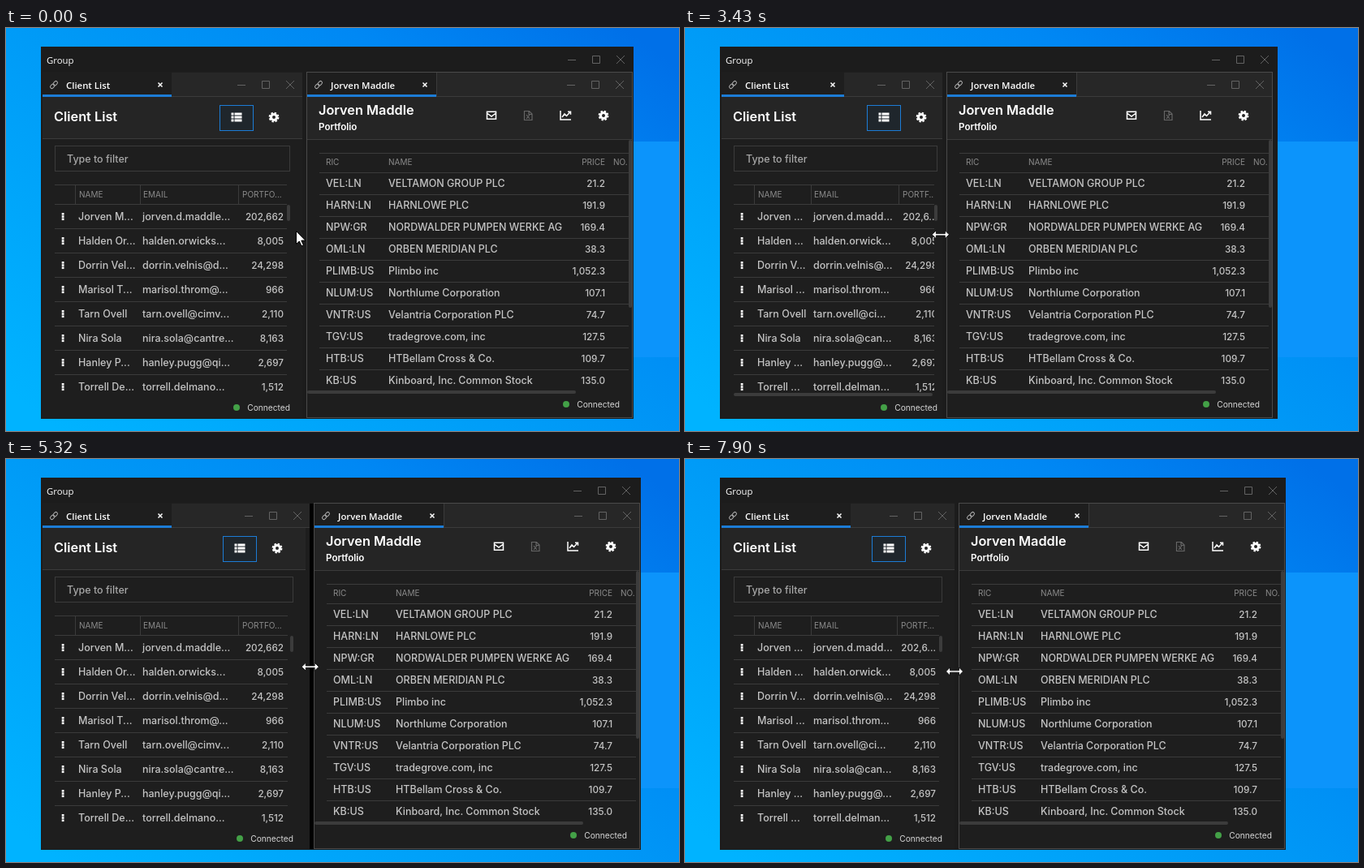
An HTML page that plays this animation: 829x497 px, repeating every 9.03 s.

```html
<!DOCTYPE html>
<html lang="en">
<head>
<meta charset="utf-8">
<title>Resizable panels</title>
<style>
html, body { margin: 0; width: 100%; height: 100%; overflow: hidden; background: #0a8ff0; }
svg { display: block; width: 829px; height: 497px; font-family: Inter, "Open Sans", sans-serif; }
.win { font-family: "Open Sans", "Noto Sans", sans-serif; font-size: 11.4px; fill: #fff; }
.tab { font-weight: 600; }
.title { font-size: 16.3px; font-weight: 600; fill: #fff; }
.sub { font-size: 11.6px; font-weight: 600; fill: #fff; }
.head { font-size: 10px; fill: #8b8b8b; }
.cell { font-size: 12.5px; font-weight: 500; fill: #c4c4c4; }
.num { font-size: 11.7px; }
.status { font-size: 10.2px; fill: #d6d6d6; }
.hover { fill: #fff; font-weight: 600; }
.end { text-anchor: end; }
.line { stroke: #3b3b3b; fill: none; shape-rendering: crispEdges; }
.controls { stroke: #636363; fill: none; }
.icon { stroke: #fff; fill: none; stroke-width: 1.5; }
</style>
</head>
<body>
<svg viewBox="0 0 829 497" id="stage"></svg>
<script>
const LOOP = 9030, STEP = 70;

// Left edge of the right panel over time.
const edgeKeys = [[0, 370], [2310, 370], [2590, 361], [2730, 357], [2870, 353], [3220, 336],
  [3710, 303], [3850, 302], [3920, 301], [3990, 301], [4130, 308], [4480, 343], [4620, 352], [4760, 360],
  [5040, 370], [5740, 392], [5880, 397], [5950, 398], [6360, 398], [6430, 396], [6780, 373],
  [6920, 368], [6990, 362], [7060, 359], [7270, 350], [7620, 337], [7900, 337]];
const cursorYKeys = [[2310, 253], [2870, 253], [3990, 256.5], [4760, 254.5], [5880, 258], [7060, 260.5], [7900, 262]];
const arrowKeys = [[0, 357, 250], [520, 361, 250], [585, 366, 251], [650, 370, 252], [1110, 367, 252]];

const clients = [
  ["Jorven Maddle", "jorven.d.maddle@zelvora.example", "202,662"],
  ["Halden Orwicks", "halden.orwicks@ambrilo.example", "8,005"],
  ["Dorrin Velnis", "dorrin.velnis@dulvine.example", "24,298"],
  ["Marisol Throm", "marisol.throm@krelma.example", "966"],
  ["Tarn Ovell", "tarn.ovell@cimvora.example", "2,110"],
  ["Nira Sola", "nira.sola@cantrex.example", "8,163"],
  ["Hanley Pugg", "hanley.pugg@qiv.example", "2,697"],
  ["Torrell Delmano", "torrell.delmano@sprilla.example", "1,512"]];
const holdings = [
  ["VEL:LN", "VELTAMON GROUP PLC", "21.2"],
  ["HARN:LN", "HARNLOWE PLC", "191.9"],
  ["NPW:GR", "NORDWALDER PUMPEN WERKE AG", "169.4"],
  ["OML:LN", "ORBEN MERIDIAN PLC", "38.3"],
  ["PLIMB:US", "Plimbo inc", "1,052.3"],
  ["NLUM:US", "Northlume Corporation", "107.1"],
  ["VNTR:US", "Velantria Corporation PLC", "74.7"],
  ["TGV:US", "tradegrove.com, inc", "127.5"],
  ["HTB:US", "HTBellam Cross & Co.", "109.7"],
  ["KB:US", "Kinboard, Inc. Common Stock", "135.0"]];

const rect = (x, y, w, h, fill, more = "") =>
  `<rect x="${x}" y="${y}" width="${w}" height="${h}" fill="${fill}" ${more}/>`;
const text = (x, y, cls, str, more = "") =>
  `<text x="${x}" y="${y}" class="${cls}" ${more}>${str.replace(/&/g, "&amp;")}</text>`;
const path = (d, cls, more = "") => `<path d="${d}" class="${cls}" ${more}/>`;
const at = (x, y, body) => `<g transform="translate(${x} ${y})">${body}</g>`;

const controls = (x, y) => at(x, y, path("M-5 .5H5M25.5-4.5h9v9h-9zM55-5l10 10M65-5l-10 10", "controls"));
const gear = (x, y) => at(x, y,
  '<circle r="3.5" fill="none" stroke="#fff" stroke-width="3"/>' +
  '<circle r="5.4" fill="none" stroke="#fff" stroke-width="2" stroke-dasharray="2.4 1.84"/>');
const link = (x, y) => at(x, y,
  '<g transform="rotate(-45)" fill="none" stroke="#aaa"><rect x="-5.5" y="-2" width="6" height="4" rx="2"/>' +
  '<rect x="-.5" y="-2" width="6" height="4" rx="2"/></g>');
const cross = (x, y) => path(`M${x - 2.5} ${y - 2.5}l5 5m0-5l-5 5`, "icon");
const connected = (right, y) =>
  `<circle cx="${right - 66}" cy="${y}" r="4" fill="#43a047"/>` + text(right, y + 4, "status end", "Connected");

const dots = y => [-4.5, -1.25, 2].map(d => rect(68.7, y + d, 2.8, 2.6, "#fff")).join("");

const listIcon = [104.5, 108.5, 112.5].map(y =>
  rect(-72.5, y, 3, 3, "#fff") + rect(-68.5, y, 9, 3, "#fff")).join("");

// Everything in the right panel is laid out relative to its left edge.
const holdingRows = holdings.map(([ric, name, price], i) => {
  const y = 196 + 27 * i;
  return text(24, y, "cell", ric) + text(101, y, "cell", name) + text(368, y, "cell num end", price) +
    (i < 9 ? path(`M16 ${y + 9.5}H397`, "line") : "");
}).join("");

const rightPanel =
  rect(.5, 54.5, 401, 426, "#1e1e1e", 'stroke="#4a4a4a"') +
  rect(160, 55, 241, 29, "#272727") + path("M160.5 55v29M160 84.5H401", "line") +
  rect(1, 82, 159, 3, "#1c7cd6") + link(15, 70) + text(30, 75, "win tab", "Jorven Maddle") +
  cross(146, 70) + controls(326, 70) +
  rect(1, 85, 400, 52, "#252525") + path("M1 137.5H401", "line") +
  text(15, 107, "title", "Jorven Maddle") + text(15, 126, "sub", "Portfolio") +
  path("M222.5 103.2h11v9h-11zM222.5 105l5.5 4 5.5-4", "icon") +
  path("M268.5 102.5h6l3.5 3.5v7.5h-9.5zM274 102.5v4h4M271 107l4 5m0-5l-4 5", "icon", 'style="stroke:#666;stroke-width:1.2"') +
  path("M313 102v11h13M315 110l3-4 2.5 2.5 4.5-5M322 103.2h3.5v3.5", "icon") + gear(366, 108) +
  path("M16 154.5H397M16 178.5H397", "line") +
  text(24, 169, "head", "RIC") + text(101, 169, "head", "NAME") +
  text(368, 169, "head end", "PRICE") + text(378, 169, "head", "NO.") + holdingRows +
  rect(397, 138, 4, 207, "#3c3c3c", 'rx="2"') + rect(1, 447, 331, 4, "#3c3c3c", 'rx="2"') +
  connected(386, 464);

const clip = (id, x, y, h) => `<clipPath id="${id}">${rect(x, y, 100, h, "#fff", `id="${id}Rect"`)}</clipPath>`;

const stage = document.getElementById("stage");
stage.innerHTML = `
<defs>
  <linearGradient id="sky" x1="0" y1=".9" x2="1" y2=".1">
    <stop offset="0" stop-color="#00b3ff"/><stop offset=".5" stop-color="#0098f6"/>
    <stop offset=".75" stop-color="#0088f4"/><stop offset="1" stop-color="#0070e8"/>
  </linearGradient>
  ${clip("panel", 45, 54, 427)}${clip("table", 60, 190, 264)}
</defs>` +
  rect(0, 0, 829, 497, "url(#sky)") + rect(580, 140, 266, 266, "#0c94fb") +
  rect(43, 23, 730, 459, "#1c1c1c", 'id="frame"') + rect(0, 55, 5, 426, "#000", 'id="gap"') +
  text(50, 44, "win", "Group") + `<g id="frameControls">${controls(0, 39)}</g>` +
  `<g clip-path="url(#panel)">` +
    rect(45, 54, 500, 427, "#1e1e1e") + rect(45, 55, 500, 29, "#272727") + path("M45 84.5H545", "line") +
    rect(45, 85, 300, 51, "#252525", 'id="listHead"') + path("", "line", 'id="listHeadLine"') +
    rect(45, 55, 159, 29, "#1e1e1e", 'id="tabBack"') + rect(45, 82, 159, 3, "#1c7cd6", 'id="tabLine"') +
    link(59, 70) + text(74, 75, "win tab", "Client List") + `<g id="tabClose">${cross(0, 70)}</g>` +
    `<g id="listControls">${controls(-80, 70)}</g>` +
    text(59, 115, "title", "Client List") +
    rect(60.5, 145.5, 289, 31, "#1e1e1e", 'id="filter" stroke="#3b3b3b"') +
    text(75, 166, "cell", "Type to filter", 'style="fill:#a8a8a8"') +
    `<g id="listTools">` + rect(-86.5, 95.5, 41, 31, "#1f262c", 'stroke="#1c7cd6"') + listIcon + gear(-20, 110) +
      connected(0, 468) + rect(-4, 218, 4, 20, "#3c3c3c", 'rx="2"') + `</g>` +
    `<g id="rows" clip-path="url(#table)"></g>` +
    rect(60, 450, 100, 4, "#3c3c3c", 'id="listScroll" rx="2"') +
  `</g>
  <g id="right">${rightPanel}</g>
  <g id="arrow">${path("M.5.5v16l3.8-3.5 2.7 5.8 2.4-1.1-2.6-5.6h5z", "", 'fill="#fff" stroke="#000"')}</g>
  <g id="resize">${path("M-10.5 0l5-5v3.8h11v-3.8l5 5-5 5v-3.8h-11v3.8z", "", 'fill="#fff" stroke="#000" stroke-width=".8"')}</g>`;

const el = {};
stage.querySelectorAll("[id]").forEach(node => el[node.id] = node);
const set = (id, attr, value) => el[id].setAttribute(attr, value);
const move = (id, x, y = 0) => set(id, "transform", `translate(${x} ${y})`);

const pen = document.createElement("canvas").getContext("2d");
function fit(str, width, font) {
  pen.font = font + " Inter, sans-serif";
  const wide = s => pen.measureText(s).width > width;
  if (!wide(str)) return str;
  let n = str.length;
  while (n > 1 && wide(str.slice(0, n) + "...")) n--;
  return str.slice(0, n) + "...";
}

function sample(keys, t) {
  let i = 1;
  while (i < keys.length - 1 && keys[i][0] < t) i++;
  const [t0, a] = keys[i - 1], [t1, b] = keys[i];
  return a + (b - a) * Math.min(1, Math.max(0, (t - t0) / (t1 - t0)));
}
const edgeAt = t => Math.round(sample(edgeKeys, t));

// The drag is seen in steps, with one pause at its far right.
function stepTime(t) {
  if (t < 2380) return 0;
  if (t < 6430) return Math.min(6160, Math.floor(t / STEP) * STEP);
  return Math.min(7900, 6430 + Math.floor((t - 6430) / STEP) * STEP);
}

function drawTable(tableRight, hover) {
  const flex = tableRight - 85;
  const email = Math.round(85 + flex * .305), value = Math.round(85 + flex * .769);
  const nameRoom = email - 94, emailRoom = value - email - 8, valueRoom = tableRight - value - 8;
  const headFont = "10px", cellFont = "500 12.5px";
  let out = path(`M60 193.5H${tableRight}M60 217.5H${tableRight}` +
    [85, email, value].map(x => `M${x + .5} 193v24`).join(""), "line") +
    text(90, 209, "head", "NAME") + text(email + 4, 209, "head", "EMAIL") +
    text(value + 5, 209, "head", fit("PORTFOLIO", valueRoom, headFont));
  clients.forEach(([name, mail, amount], i) => {
    const y = 237 + 30 * i, cls = "cell" + (hover && i === 1 ? " hover" : "");
    out += dots(y - 4.5) + text(89, y, cls, fit(name, nameRoom, cellFont)) +
      text(email + 3, y, cls, fit(mail, emailRoom, cellFont)) +
      text(tableRight - 5, y, cls + " num end", fit(amount, valueRoom + 1, "500 11.7px")) +
      path(`M60 ${y + 10.5}H${tableRight}`, "line");
  });
  el.rows.innerHTML = out;
}

// Contents trail the dragged edge: window frame first, then list, then table.
function drawPanels(q) {
  const edge = edgeAt(q), frameEdge = edgeAt(q - STEP);
  const listRight = edgeAt(q - 2 * STEP) - 20, tableRight = edgeAt(q - 4 * STEP) - 23;
  const tabWidth = Math.min(159, edge - 171);
  set("frame", "width", Math.max(edge, frameEdge) + 360);
  move("frameControls", frameEdge + 327);
  move("right", edge);
  set("gap", "x", edge - 5);
  set("gap", "fill", edge > frameEdge ? "#000" : "#1c1c1c");
  set("panelRect", "width", edge - 50);
  set("tabBack", "width", tabWidth);
  set("tabLine", "width", tabWidth);
  move("tabClose", tabWidth - 14 + 45);
  move("listControls", edge);
  set("listHead", "width", listRight - 30);
  set("listHeadLine", "d", `M45 136.5H${listRight + 15}`);
  set("filter", "width", listRight - 61);
  move("listTools", listRight);
  set("tableRect", "width", listRight - 64);
  set("listScroll", "width", listRight - 66);
  set("listScroll", "visibility", tableRight > listRight - 3 ? "visible" : "hidden");
  drawTable(tableRight, q >= 5670 && q < 6500);
}

let shown = -1;
function render(t) {
  const q = stepTime(t), resizing = t >= 1510;
  if (q !== shown) drawPanels(shown = q);
  set("arrow", "visibility", resizing ? "hidden" : "visible");
  set("resize", "visibility", resizing ? "visible" : "hidden");
  const [, x, y] = arrowKeys.filter(k => k[0] <= t).pop();
  move("arrow", x, y);
  move("resize", sample(edgeKeys, q + 30) - (q ? 5 : 6), sample(cursorYKeys, q));
}

const start = performance.now();
function tick() {
  render((performance.now() - start) % LOOP);
  requestAnimationFrame(tick);
}
tick();
</script>
</body>
</html>
```
